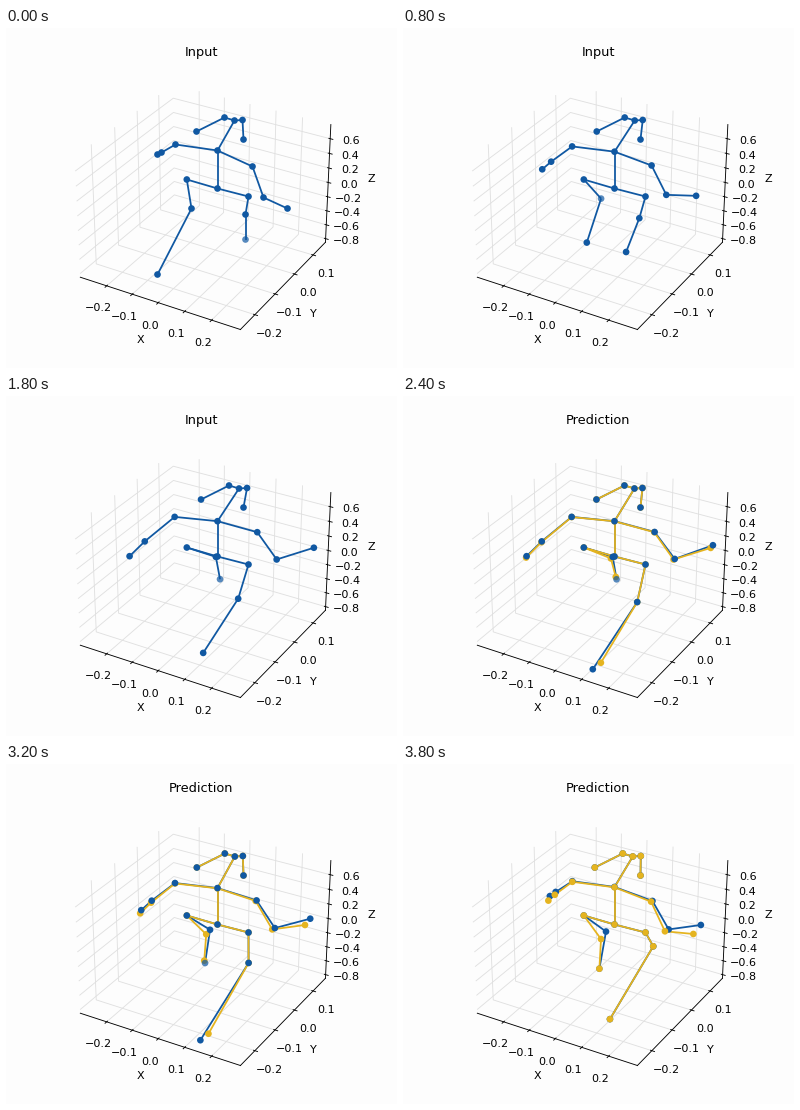
A matplotlib script that plays this animation: 391 px wide and 340 px high, repeating every 4000 ms.

```python
import numpy as np
import matplotlib.pyplot as plt
from matplotlib.animation import FuncAnimation
from matplotlib.collections import LineCollection
from matplotlib.colors import to_rgba

W, H, DPI = 391, 340, 80
FRAMES, SPLIT = 20, 10
BLUE, GOLD = "#1058a2", "#e5b41f"

# Starting pose, in stage pixels
REST = {
    "pelvis": (211, 160), "hip_a": (180.3, 151), "hip_b": (242, 168),
    "knee_a": (185, 180), "ankle_a": (151, 246),
    "knee_b": (239, 186), "ankle_b": (239, 211),
    "neck": (211, 122), "nose": (228, 92),
    "shoulder_a": (169, 116), "elbow_a": (155, 124), "hand_a": (151, 126),
    "shoulder_b": (246, 138), "elbow_b": (257, 169), "hand_b": (281, 180),
    "eye_a": (218, 89), "ear_a": (190, 103),
    "eye_b": (236, 91.5), "ear_b": (237, 111),
}
CHAINS = [
    "pelvis hip_a knee_a ankle_a", "pelvis hip_b knee_b ankle_b",
    "pelvis neck nose", "neck shoulder_a elbow_a hand_a",
    "neck shoulder_b elbow_b hand_b", "nose eye_a ear_a", "nose eye_b ear_b",
]
BONES = [b for c in CHAINS for b in zip(c.split(), c.split()[1:])]

# Leading joints: (x, y) shares of the swing, drift and late-swing motions
LEAD = {
    "hand_a": [(-29, 35), (0, 0), (0, 0)],
    "hand_b": [(21, -22), (13, -16), (0, 0)],
    "ankle_a": [(64, -64), (62, -55), (-42, 36)],
    "ankle_b": [(-22, 0), (-16, 0), (-20, 67)],
    "knee_b": [(-14, 8), (13, -25), (0, 30)],
    "nose": [(9, 0), (7, 0), (-11, 0)],
}
# Other joints copy a part of a leading joint's travel
FOLLOW = {
    "knee_a": ("ankle_a", (0.39, 0.31)),
    "shoulder_a": ("hand_a", (0.03, 0.13)),
    "elbow_a": ("hand_a", (0.6, 0.62)),
    "shoulder_b": ("hand_b", (0.18, 0.08)),
    "elbow_b": ("hand_b", (0.5, 0.21)),
    "neck": ("hand_a", (0, 0.08)),
    "eye_a": ("nose", (1, 0)), "ear_a": ("nose", (1, 0)),
    "eye_b": ("nose", (1, 0)),
}
# Prediction error: one part grows steadily, one rises and fades
GROW = {"hand_a": (-1.5, 4.5), "hand_b": (-7.5, 9), "knee_a": (-5, 7.5)}
HUMP = {"ankle_a": (-1, -3), "ankle_b": (10, -8)}


def travel(joint, t):
    swing = np.sin(np.pi * t / 21) ** 1.5
    drift = t / 19
    late = t**2 * (21.75 - t) / 1524
    return np.dot((swing, drift, late), LEAD.get(joint, np.zeros((3, 2))))


def error(joint, t):
    e = (t - 9) / 10
    grow, hump = (np.array(d.get(joint, (0, 0))) for d in (GROW, HUMP))
    return grow * e + hump * np.sin(np.pi * e)


def make_pose(t, predicted=False):
    def offset(joint):
        return travel(joint, t) + (error(joint, t) if predicted else 0)

    pose = {j: np.array(p) + offset(j) for j, p in REST.items()}
    for j, (lead, share) in FOLLOW.items():
        pose[j] = pose[j] + np.array(share) * offset(lead)
    return pose


plt.rcParams.update({"font.family": "DejaVu Sans", "grid.color": "#e0e0e0",
                     "grid.linewidth": 0.8})
fig = plt.figure(figsize=(W / DPI, H / DPI), dpi=DPI, facecolor="#fdfdfd")

SIDE = 285
box = fig.add_axes([52.8 / W, (H - 319.5) / H, SIDE / W, SIDE / H],
                   projection="3d", facecolor="none")
box.set_xticks(np.arange(-2, 3) / 10)
box.set_yticks(np.arange(-2, 2) / 10)
box.set_zticks(np.arange(-4, 4) / 5)
box.set_xlim(-0.305, 0.305)
box.set_ylim(-0.269, 0.169)
box.set_zlim(-0.852, 0.79)
for axis, name in zip((box.xaxis, box.yaxis, box.zaxis), "XYZ"):
    axis.set_label_text(name)
    axis.labelpad = 3
    axis.set_pane_color((1, 1, 1, 0))
    axis.pane.set_edgecolor("#efefef")

title = fig.text(195 / W, (H - 28) / H, "", ha="center", fontsize=11.6)

stage = fig.add_axes([0, 0, 1, 1], facecolor="none")
stage.set(xlim=(-0.5, W - 0.5), ylim=(H - 0.5, -0.5))
stage.axis("off")


class Skeleton:
    def __init__(self, color, z):
        self.color = color
        self.lines = LineCollection([], colors=color, linewidths=1.6, zorder=z)
        stage.add_collection(self.lines, autolim=False)
        self.dots = stage.scatter([], [], s=36, linewidths=0)

    def show(self, pose, z, faded=None):
        self.lines.set_segments([[pose[a], pose[b]] for a, b in BONES])
        self.dots.set_offsets(list(pose.values()))
        self.dots.set_facecolors(
            [to_rgba(self.color, 0.7 if j == faded else 1) for j in pose])
        self.dots.set_zorder(z)

    def visible(self, on):
        self.lines.set_visible(on)
        self.dots.set_visible(on)


real, guess = Skeleton(BLUE, 1), Skeleton(GOLD, 2)


def farthest(n):
    """The leg joint deepest in the scene, drawn paler."""
    return "ankle_b" if n < 2 else "knee_a" if n < 6 else "ankle_a"


def draw(n):
    predicting = n >= SPLIT
    title.set_text("Prediction" if predicting else "Input")
    real.show(make_pose(n), 4, farthest(n))
    guess.visible(predicting)
    if predicting:
        guess.show(make_pose(n, True), 5 if n >= 18 else 3)
    return title, real.lines, real.dots, guess.lines, guess.dots


anim = FuncAnimation(fig, draw, frames=FRAMES, interval=200, repeat=True,
                     repeat_delay=0, blit=False)
plt.show()
```
